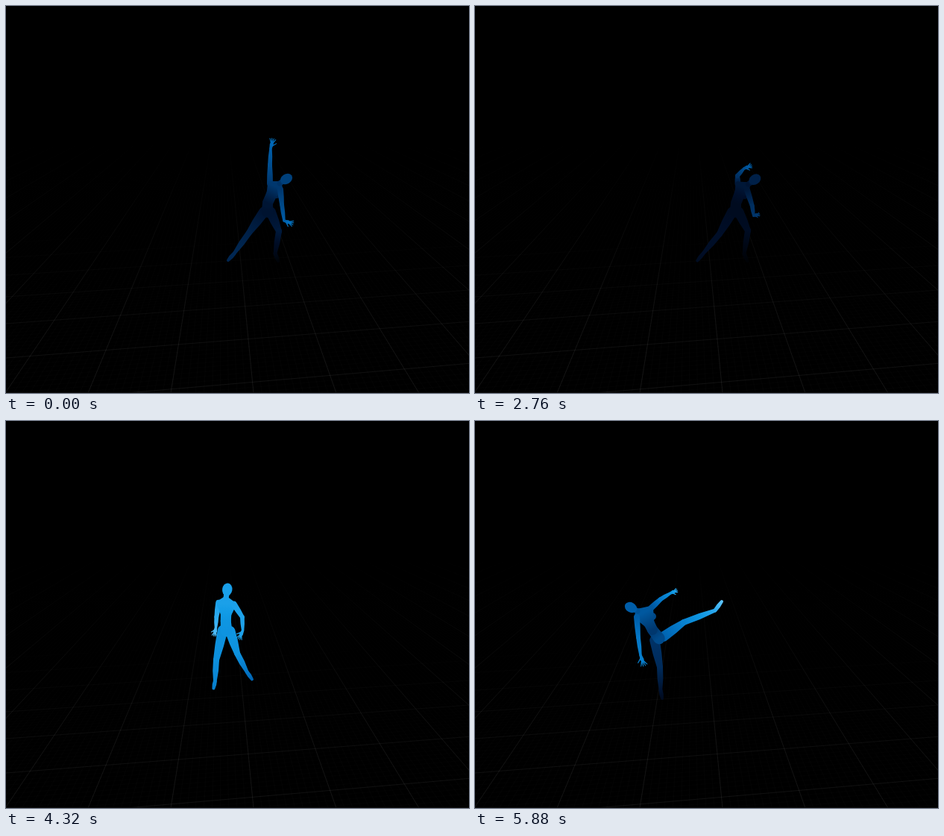
These frames come from a looping animation (621x519 px, 5.92 s). An HTML page with a canvas:

```html
<!DOCTYPE html>
<html lang="en">
<head>
<meta charset="utf-8">
<title>Dancer</title>
<style>
  html, body { margin: 0; width: 621px; height: 519px; overflow: hidden; background: #000; }
  canvas { position: absolute; left: 0; top: 0; }
</style>
</head>
<body>
<canvas id="floor" width="621" height="519"></canvas>
<canvas id="stage" width="621" height="519"></canvas>
<script>
const W = 621, H = 519, LOOP = 5920, STEP = 40;
const floor = document.getElementById('floor').getContext('2d');
const ctx = document.getElementById('stage').getContext('2d');

// Floor: two families of perspective lines, fading into the distance.
function drawFloor() {
  const near = { x: 290, y: 87 }, side = { x: 7700, y: -132 };
  const fade = (top, level) => {
    const g = floor.createLinearGradient(0, top, 0, H);
    for (const [p, k] of [[0, 0], [0.3, 0.35], [0.65, 0.85], [1, 1]]) {
      g.addColorStop(p, `rgba(255,255,255,${level * k})`);
    }
    return g;
  };
  const line = (x1, y1, x2, y2, style, width) => {
    floor.strokeStyle = style;
    floor.lineWidth = width;
    floor.beginPath();
    floor.moveTo(x1, y1);
    floor.lineTo(x2, y2);
    floor.stroke();
  };
  const along = [fade(180, 0.018), fade(180, 0.08)];
  const across = [fade(300, 0.014), fade(300, 0.065)];
  for (let i = -100; i <= 160; i++) {
    const major = i % 10 === 0;
    line(near.x, near.y, -1 + i * 11.1, H, along[+major], major ? 1 : 0.7);
  }
  for (let i = -20; i <= 50; i++) {
    const major = i % 10 === 0;
    const y = 96 + 1 / (1 / 376 + i * 0.0000371);
    line(0, y, W, y + (side.y - y) * W / side.x, across[+major], major ? 1 : 0.7);
  }
  floor.fillStyle = '#0e0e0e';
  floor.fillRect(0, H - 1, W, 1);
}

// Each joint is [x, y, glow]; a key inherits whatever it does not set.
const keys = [];
function key(time, joints, gain = 1) {
  const last = keys.length ? keys[keys.length - 1].pose : {};
  const pose = {};
  for (const n in last) pose[n] = [last[n][0], last[n][1], last[n][2] * gain];
  keys.push({ time, pose: Object.assign(pose, joints) });
}

key(0, {
  head: [376, 232, .45], neck: [367, 238, .4], bust: [363, 253, .31], waist: [351, 264, .24],
  shA: [354, 238, .42], elA: [354, 213, .5], wrA: [355, 191, .56], tipA: [358, 178, .64],
  shB: [368, 246, .42], elB: [370, 266, .48], wrB: [373, 288, .56], tipB: [385, 292, .66],
  hipA: [346, 276, .23], knA: [326, 304, .3], anA: [306, 332, .34], toeA: [298, 341, .33],
  hipB: [355, 276, .22], knB: [366, 302, .26], anB: [361, 332, .12], toeB: [365, 342, .04]
});
key(1200, { elB: [372, 267, .34], wrB: [377, 287, .4], tipB: [390, 290, .45] }, 0.68);
key(1800, {
  head: [376, 231, .28], shA: [352, 236, .22], elA: [347, 217, .35], wrA: [357, 209, .45],
  tipA: [371, 211, .56], elB: [372, 269, .28], wrB: [374, 289, .33], tipB: [385, 292, .36]
}, 0.72);
key(2480, {});
key(3360, {
  head: [371, 238, .44], neck: [362, 243, .42], bust: [354, 258, .36], waist: [344, 266, .36],
  shA: [354, 246, .42], elA: [368, 262, .58], wrA: [372, 247, .68], tipA: [369, 228, .68],
  shB: [355, 248, .46], elB: [371, 261, .68], wrB: [373, 245, .7], tipB: [371, 229, .68],
  hipA: [339, 276, .38], knA: [334, 311, .42], anA: [309, 330, .3], toeA: [300, 344, .2],
  hipB: [346, 277, .37], knB: [366, 299, .37], anB: [361, 333, .1], toeB: [366, 342, .05]
});
key(3660, {
  head: [361, 233, .6], neck: [354, 241, .55], bust: [345, 259, .5], waist: [338, 266, .5],
  shA: [341, 244, .55], elA: [346, 257, .66], wrA: [353, 246, .75], tipA: [358, 235, .78],
  shB: [357, 249, .55], elB: [373, 248, .67], wrB: [379, 233, .74], tipB: [385, 221, .76],
  hipA: [333, 279, .5], knA: [322, 306, .46], anA: [314, 334, .35], toeA: [306, 346, .3],
  hipB: [341, 279, .47], knB: [355, 303, .46], anB: [361, 332, .22], toeB: [366, 343, .17]
});
key(4000, {
  head: [334, 244, .72], neck: [328, 251, .75], bust: [318, 261, .76], waist: [326, 270, .74],
  shA: [315, 247, .76], elA: [304, 254, .82], wrA: [295, 269, .92], tipA: [291, 282, .98],
  shB: [336, 256, .74], elB: [345, 273, .74], wrB: [346, 290, .75], tipB: [342, 299, .76],
  hipA: [322, 284, .68], knA: [306, 305, .66], anA: [321, 340, .5], toeA: [312, 348, .52],
  hipB: [331, 286, .74], knB: [336, 315, .74], anB: [357, 329, .62], toeB: [363, 341, .52]
});
key(4260, {
  head: [303, 225, .82], neck: [301, 237, .82], bust: [299, 257, .84], waist: [301, 268, .78],
  shA: [291, 243, .82], elA: [288, 261, .86], wrA: [287, 276, .92], tipA: [285, 288, .95],
  shB: [312, 245, .82], elB: [322, 262, .82], wrB: [323, 280, .82], tipB: [319, 292, .82],
  hipA: [297, 280, .76], knA: [288, 318, .74], anA: [288, 347, .68], toeA: [285, 356, .66],
  hipB: [307, 281, .78], knB: [316, 311, .76], anB: [330, 335, .65], toeB: [337, 345, .58]
});
key(4640, {
  head: [268, 241, .82], neck: [266, 251, .83], bust: [264, 268, .87], waist: [264, 279, .78],
  shA: [257, 255, .84], elA: [250, 270, .88], wrA: [236, 283, .9], tipA: [227, 289, .92],
  shB: [274, 258, .84], elB: [289, 277, .88], wrB: [287, 294, .88], tipB: [272, 298, .84],
  hipA: [259, 292, .77], knA: [249, 330, .82], anA: [247, 362, .83], toeA: [249, 372, .8],
  hipB: [269, 294, .79], knB: [280, 324, .8], anB: [293, 345, .66], toeB: [297, 355, .62]
});
key(5280, {
  head: [237, 234, .58], neck: [238, 247, .56], bust: [234, 268, .58], waist: [246, 276, .52],
  shA: [241, 254, .56], elA: [245, 268, .56], wrA: [243, 280, .6], tipA: [239, 287, .8],
  shB: [241, 260, .58], elB: [214, 261, .68], wrB: [191, 259, .84], tipB: [175, 257, .96],
  hipA: [246, 287, .52], knA: [244, 325, .52], anA: [248, 361, .46], toeA: [248, 370, .44],
  hipB: [254, 287, .5], knB: [272, 319, .52], anB: [296, 347, .56], toeB: [300, 362, .55]
});
key(5420, {
  head: [230, 233, .56], neck: [232, 245, .52], bust: [238, 265, .5], waist: [244, 278, .48],
  shA: [244, 254, .54], elA: [250, 263, .62], wrA: [254, 252, .7], tipA: [261, 243, .8],
  shB: [231, 259, .56], elB: [214, 275, .66], wrB: [206, 291, .78], tipB: [202, 304, .86],
  hipB: [255, 288, .52], knB: [277, 307, .58], anB: [297, 329, .68], toeB: [304, 343, .75]
});
key(5880, {
  head: [209, 250, .56], neck: [218, 255, .52], bust: [238, 262, .48], waist: [238, 280, .42],
  shA: [236, 251, .52], elA: [249, 239, .66], wrA: [262, 231, .76], tipA: [271, 227, .86],
  shB: [217, 263, .56], elB: [219, 290, .66], wrB: [222, 314, .68], tipB: [227, 328, .7],
  hipA: [241, 294, .4], knA: [248, 330, .36], anA: [249, 361, .23], toeA: [251, 372, .16],
  hipB: [253, 289, .58], knB: [280, 270, .7], anB: [322, 254, .86], toeB: [331, 242, .98]
});

// Monotone cubic through the keys, so held poses never overshoot.
function slopeAt(i, name, c) {
  if (i === 0 || i === keys.length - 1) return 0;
  const rate = j => (keys[j + 1].pose[name][c] - keys[j].pose[name][c]) / (keys[j + 1].time - keys[j].time);
  const a = rate(i - 1), b = rate(i);
  return a * b <= 0 ? 0 : 2 * a * b / (a + b);
}
function poseAt(t) {
  let i = 0;
  while (i < keys.length - 2 && t >= keys[i + 1].time) i++;
  const a = keys[i], b = keys[i + 1], d = b.time - a.time;
  const u = Math.min(1, (t - a.time) / d), v = 1 - u;
  const pose = {};
  for (const n in a.pose) {
    pose[n] = a.pose[n].map((p, c) =>
      p * v * v * (1 + 2 * u) + b.pose[n][c] * u * u * (3 - 2 * u) +
      d * u * v * (v * slopeAt(i, n, c) - u * slopeAt(i + 1, n, c)));
  }
  return pose;
}

const ramp = [[0, 0, 0], [0, 14, 40], [0, 50, 102], [0, 104, 184], [16, 154, 230], [104, 202, 255]];
function color(glow) {
  const g = Math.max(0, Math.min(0.9999, glow)) * 5, i = Math.floor(g);
  return `rgb(${ramp[i].map((c, k) => Math.round(c + (ramp[i + 1][k] - c) * (g - i)))})`;
}
const mix = (p, q, k = 0.5) => p.map((c, i) => c + (q[i] - c) * k);

function shade(p, q) {
  const fill = ctx.createLinearGradient(p[0], p[1], q[0], q[1]);
  for (const k of [0, 0.5, 1]) fill.addColorStop(k, color(mix(p, q, k)[2]));
  return fill;
}

// A rounded limb with its own start, middle and end radius.
function limb(p, q, r1, r2, rm = (r1 + r2) / 2) {
  const a = Math.atan2(q[1] - p[1], q[0] - p[0]), right = Math.PI / 2;
  const nx = -Math.sin(a), ny = Math.cos(a), m = mix(p, q);
  const bend = 2 * rm - (r1 + r2) / 2;
  ctx.fillStyle = shade(p, q);
  ctx.beginPath();
  ctx.arc(p[0], p[1], r1, a + right, a - right);
  ctx.quadraticCurveTo(m[0] - nx * bend, m[1] - ny * bend, q[0] - nx * r2, q[1] - ny * r2);
  ctx.arc(q[0], q[1], r2, a - right, a + right);
  ctx.quadraticCurveTo(m[0] + nx * bend, m[1] + ny * bend, p[0] + nx * r1, p[1] + ny * r1);
  ctx.fill();
}

function hand(wrist, tip) {
  const a = Math.atan2(tip[1] - wrist[1], tip[0] - wrist[0]);
  const size = Math.hypot(tip[0] - wrist[0], tip[1] - wrist[1]);
  const palm = mix(wrist, tip, 0.42);
  const finger = (from, turn, length) => limb(from, [
    from[0] + Math.cos(a + turn) * length, from[1] + Math.sin(a + turn) * length, tip[2]
  ], 1, 0.5);
  limb(wrist, palm, 1.7, 2.5);
  for (const turn of [-0.5, -0.17, 0.17, 0.5]) finger(palm, turn, size * 0.62);
  finger(mix(wrist, tip, 0.2), 0.85, size * 0.6);
}

function arm(p, s) {
  limb(p['sh' + s], p['el' + s], 4, 2.9, 3.7);
  limb(p['el' + s], p['wr' + s], 2.9, 1.7, 2.7);
  hand(p['wr' + s], p['tip' + s]);
}
function leg(p, s) {
  limb(p['hip' + s], p['kn' + s], 6.8, 4, 5.9);
  limb(p['kn' + s], p['an' + s], 4, 2.3, 3.9);
  limb(p['an' + s], p['toe' + s], 2.5, 2, 2.8);
}
function torso(p) {
  const chest = mix(p.shA, p.shB), pelvis = mix(p.hipA, p.hipB);
  limb(p.waist, pelvis, 7, 7.8);
  limb(mix(chest, p.waist, 0.3), p.waist, 7.4, 7);
  limb(mix(chest, p.waist, 0.4), p.bust, 7, 5);
  limb(chest, p.neck, 5, 3.5);
  // The rib cage tapers from each shoulder, and the shoulders slope from the neck.
  const fill = shade(chest, p.waist);
  for (const end of [p.waist, p.neck]) {
    ctx.fillStyle = ctx.strokeStyle = fill;
    ctx.lineWidth = 6;
    ctx.lineJoin = 'round';
    ctx.beginPath();
    for (const joint of [p.shA, end, p.shB]) ctx.lineTo(joint[0], joint[1]);
    ctx.closePath();
    ctx.fill();
    ctx.stroke();
  }
}
function head(p) {
  const a = Math.atan2(p.head[1] - p.neck[1], p.head[0] - p.neck[0]);
  limb(p.neck, p.head, 3.5, 4);
  ctx.fillStyle = color(p.head[2]);
  ctx.beginPath();
  ctx.ellipse(p.head[0], p.head[1], 8.6, 6.7, a, 0, Math.PI * 2);
  ctx.fill();
}

function frame(now) {
  const t = Math.floor((now % LOOP) / STEP) * STEP;
  const p = poseAt(t);
  ctx.clearRect(0, 0, W, H);
  arm(p, 'A');
  leg(p, 'A');
  leg(p, 'B');
  torso(p);
  head(p);
  arm(p, 'B');
}

drawFloor();
const start = performance.now();
function tick() {
  frame(performance.now() - start);
  requestAnimationFrame(tick);
}
tick();
</script>
</body>
</html>
```
